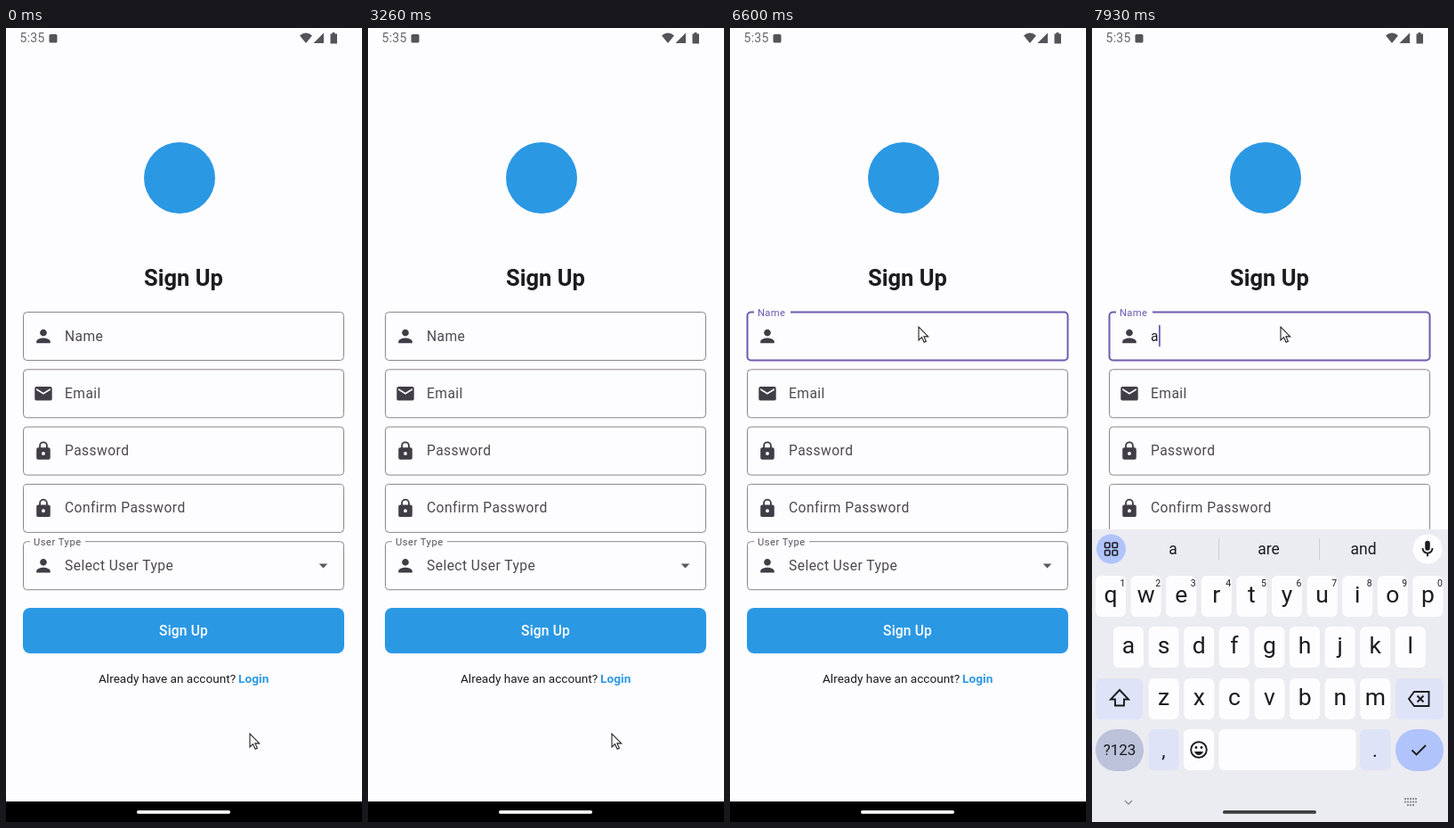
An HTML page that plays this animation: 400x890 px, repeating every 8 s.

```html
<!DOCTYPE html>
<html lang="en">
<head>
<meta charset="utf-8">
<title>Sign Up</title>
<style>
  html, body { margin: 0; width: 100%; height: 100%; overflow: hidden; background: #fdfcff; }
  svg { display: block; width: 400px; height: 890px; font-family: Roboto, sans-serif; }
  .label { font-size: 15.6px; letter-spacing: .44px; fill: #4b4850; }
  .small { font-size: 11.2px; letter-spacing: .5px; fill: #56525c; }
  .mid { text-anchor: middle; }
  .line { fill: none; stroke: #1b1b20; stroke-width: 1.9; }
</style>
</head>
<body>
<svg id="stage" viewBox="0 0 400 890"></svg>
<script>
const INK = '#1b1b20', PAGE = '#fdfcff', ACCENT = '#2b98e4', PURPLE = '#6f5bb0', BORDER = '#8a868f';
const BOARD = '#ebebf2', BLUE = '#b0c3fb', GREY = '#dee3f7', WHITE = '#fdfdff';
const FOCUS = 6060, SLIDE = 7060, TYPED = 7730;

const ICONS = {
  person: 'M12 12c2.2 0 4-1.8 4-4s-1.8-4-4-4-4 1.8-4 4 1.8 4 4 4zm0 2c-2.7 0-8 1.3-8 4v2h16v-2c0-2.7-5.3-4-8-4z',
  mail: 'M20 4H4a2 2 0 0 0-2 2v12a2 2 0 0 0 2 2h16a2 2 0 0 0 2-2V6a2 2 0 0 0-2-2zm0 4l-8 5-8-5V6l8 5 8-5z',
  lock: 'M18 8h-1V6A5 5 0 0 0 7 6v2H6a2 2 0 0 0-2 2v10a2 2 0 0 0 2 2h12a2 2 0 0 0 2-2V10a2 2 0 0 0-2-2zm-6 9a2 2 0 1 1 0-4 2 2 0 0 1 0 4zm3.1-9H8.9V6a3.1 3.1 0 0 1 6.2 0z',
  drop: 'M7 10l5 5 5-5z',
  mic: 'M12 14a3 3 0 0 0 3-3V5a3 3 0 0 0-6 0v6a3 3 0 0 0 3 3zm5-3a5 5 0 0 1-10 0H5a7 7 0 0 0 6 6.9V21h2v-3.1A7 7 0 0 0 19 11z',
  palette: 'M12 3a9 9 0 0 0 0 18 1.5 1.5 0 0 0 1.1-2.5 1.5 1.5 0 0 1 1.1-2.5H16a5 5 0 0 0 5-5c0-4.4-4-8-9-8zM6.5 12a1.5 1.5 0 1 1 0-3 1.5 1.5 0 0 1 0 3zm3-4a1.5 1.5 0 1 1 0-3 1.5 1.5 0 0 1 0 3zm5 0a1.5 1.5 0 1 1 0-3 1.5 1.5 0 0 1 0 3zm3 4a1.5 1.5 0 1 1 0-3 1.5 1.5 0 0 1 0 3z'
};

const text = (x, y, s, attrs = '') => `<text x="${x}" y="${y}" ${attrs}>${s}</text>`;
const rect = (x, y, w, h, r, fill, attrs = '') =>
  `<rect x="${x}" y="${y}" width="${w}" height="${h}" rx="${r}" fill="${fill}" ${attrs}/>`;
const circle = (x, y, r, fill, attrs = '') => `<circle cx="${x}" cy="${y}" r="${r}" fill="${fill}" ${attrs}/>`;
const line = (d, attrs = '') => `<path d="${d}" class="line" ${attrs}/>`;
const icon = (name, x, y, size, fill) =>
  `<path d="${ICONS[name]}" fill="${fill}" transform="translate(${x - size / 2} ${y - size / 2}) scale(${size / 24})"/>`;

function field(i, name, pic) {
  const y = 318.5 + 64.3 * i;
  return rect(19.5, y, 360, 54, 4, 'none', `stroke="${BORDER}" id="box${i}"`) +
    icon(pic, 42, y + 27, 23.3, '#403d46') +
    (i ? text(66, y + 32, name, 'class="label"') : '');
}

function status() {
  return text(15.5, 16, '5:35', 'font-size="14" letter-spacing=".3" fill="#68666c"') +
    rect(48.5, 7, 9, 9.5, 1.5, '#55535a') +
    '<g fill="#55535a"><path d="M330 8.5Q337 2.5 344 8.5L337 17z"/><path d="M357 5.5V17H345.5z"/>' +
    '<path d="M364.5 6.5h2v-1.5h3v1.5h2.5V17.5h-7.5z"/></g>';
}

function page() {
  return rect(0, 0, 400, 890, 0, PAGE) + status() +
    circle(195, 168, 40, ACCENT) +
    text(199.5, 289, 'Sign Up', `class="mid" font-size="25.5" font-weight="700" fill="${INK}"`) +
    field(0, 'Name', 'person') + field(1, 'Email', 'mail') + field(2, 'Password', 'lock') +
    field(3, 'Confirm Password', 'lock') + field(4, 'Select User Type', 'person') +
    icon('drop', 356.5, 602.5, 23.3, '#5a5761') +
    rect(27, 573, 62, 5, 0, PAGE) + text(31, 579.5, 'User Type', 'class="small"') +
    rect(27, 316, 0, 5, 0, PAGE, 'id="gap"') +
    '<text id="name" class="label">Name</text>' +
    text(66, 350.5, 'a', `id="typed" font-size="15.6" fill="${INK}"`) +
    rect(66, 333, 1.8, 24, 0, PURPLE, 'id="caret"') +
    rect(19, 650, 361, 51, 8, ACCENT) +
    text(199.5, 681, 'Sign Up', 'class="mid" font-size="15.6" font-weight="500" letter-spacing=".15" fill="#fff"') +
    text(104, 734, 'Already have an account?', `font-size="13.6" fill="${INK}"`) +
    text(261, 734, 'Login', `font-size="13.6" font-weight="700" letter-spacing=".1" fill="${ACCENT}"`) +
    rect(0, 867, 400, 23, 0, '#000');
}

function gear(x, y) {
  return circle(x, y, 4.9, 'none', `stroke="${INK}" stroke-width="4"`) +
    circle(x, y, 7.6, 'none', `stroke="${INK}" stroke-width="2.6" stroke-dasharray="3.98" stroke-dashoffset="5.97"`);
}

function toolbar() {
  const faint = 'style="stroke:#a5a4ab"';
  return '<g id="tools">' +
    line('M88 593h-12a4 4 0 0 1-4-4v-9a4 4 0 0 1 4-4h10a4 4 0 0 1 4 4v7l-6 6v-6h6M77 585q4 5 8 0M77 580.5h2M83 580.5h2', faint) +
    text(139.5, 589, 'GIF', 'class="mid" font-size="14" font-weight="900" letter-spacing=".8" fill="#a5a4ab"') +
    line('M192 577h14v16h-14zM195 582h8M195 586h8M195 590h5', 'style="stroke-width:1.6"') +
    rect(195.5, 574.5, 7, 4, 1, INK) +
    gear(258.5, 584) + icon('palette', 318, 584, 22, INK) + '</g>' +
    '<g id="words" class="mid" font-size="17.5">' +
    text(91, 590, 'a') + text(198.5, 590, 'are') + text(305, 590, 'and') +
    rect(142, 572, 1, 24, 0, '#cfcfd8') + rect(255, 572, 1, 24, 0, '#cfcfd8') + '</g>';
}

function letters(row, x0, y, digits) {
  return [...row].map((c, i) => {
    const x = x0 + 39.6 * i;
    return rect(x - 17, y, 34, 46, 6, WHITE) + text(x, y + 30, c, 'class="mid" font-size="26.5"') +
      (digits ? text(x + 13.5, y + 12, (i + 1) % 10, 'class="mid" font-size="10.5"') : '');
  }).join('');
}

function keyboard() {
  let grid = '';
  for (const x of [14.5, 23]) for (const y of [577, 585.5])
    grid += rect(x, y, 5.5, 5.5, 1, 'none', 'class="line" style="stroke-width:1.6"');
  return `<g id="keys" fill="${INK}">` + rect(0, 562, 400, 400, 0, BOARD) +
    circle(21.5, 584, 16.5, BLUE) + grid + circle(377, 584, 16.5, WHITE) + icon('mic', 377, 584, 22, INK) +
    toolbar() +
    letters('qwertyuiop', 21, 614, true) + letters('asdfghjkl', 41, 671) + letters('zxcvbnm', 80.7, 729) +
    rect(4, 729, 53, 46, 6, GREY) + line('M31 742l-10 10.5h5v7h10v-7h5z') +
    rect(341, 729, 54, 46, 6, GREY) + line('M362 744h16.5v16H362l-6-8zM365.5 748.5l7 7M372.5 748.5l-7 7') +
    rect(4, 786, 54, 47, 23, '#bbc2d9') + text(31, 815, '?123', 'class="mid" font-size="17"') +
    rect(63.5, 786, 34, 46, 6, GREY) + text(80.5, 817, ',', 'class="mid" font-size="22"') +
    rect(103, 786, 34, 46, 6, WHITE) +
    circle(120, 809, 8.8, 'none', 'class="line"') + circle(117, 806.5, 1.4, INK) + circle(123, 806.5, 1.4, INK) +
    '<path d="M115 811h10q-1.5 4-5 4t-5-4"/>' +
    rect(142.5, 786, 154, 46, 6, WHITE) +
    rect(301, 786, 34.5, 46, 6, GREY) + text(318, 817, '.', 'class="mid" font-size="22"') +
    rect(341, 786, 54, 47, 23, BLUE) + line('M359.5 809.5l5 5 10.5-10.5') + '</g>' +
    '<g id="hints">' + line('M37 866l4 4 4-4', 'style="stroke:#77767e;stroke-width:1.4"') +
    line('M351 864h14M351 867.5h14M354 871h8', 'style="stroke:#77767e;stroke-width:2;stroke-dasharray:2 1"') + '</g>';
}

stage.innerHTML = page() + keyboard() + rect(147, 877, 105, 3.8, 1.9, '#fff', 'id="pill"') +
  '<path id="mouse" d="M0 0v15l3.5-3.3 2.6 5.5 2.3-1-2.5-5.3h4.8z" fill="#fff" stroke="#222" stroke-width="1.1"/>';

const el = id => document.getElementById(id);
const clamp = u => Math.max(0, Math.min(1, u));
const span = (t, from, len) => clamp((t - from) / len);
const mix = (a, b, u) => a + (b - a) * u;
const smooth = u => u * u * (3 - 2 * u);
const set = (id, attrs) => { for (const k in attrs) el(id).setAttribute(k, attrs[k]); };

// time, x, y of the mouse tip
const PATH = [[3480, 274, 791], [3600, 286, 765], [4000, 330, 430], [4300, 323, 317], [4335, 323, 317], [4460, 212, 335]];

function mouseAt(t) {
  let i = 0;
  while (i < PATH.length - 2 && t > PATH[i + 1][0]) i++;
  const [a, b] = [PATH[i], PATH[i + 1]];
  const u = smooth(span(t, a[0], b[0] - a[0]));
  return [mix(a[1], b[1], u), mix(a[2], b[2], u)];
}

function draw(t) {
  set('mouse', { transform: `translate(${mouseAt(t)})` });

  const f = smooth(span(t, FOCUS, 167)), typed = t >= TYPED;
  set('box0', { stroke: t > FOCUS ? PURPLE : BORDER, 'stroke-width': mix(1, 2, f) });
  set('gap', { width: 41 * f });
  set('name', {
    transform: `translate(${mix(66, 31, f)} ${mix(350.5, 323, f)}) scale(${mix(1, .72, f)})`,
    style: t > FOCUS ? `fill:${PURPLE}` : ''
  });

  const lit = typed || (t >= FOCUS && Math.floor((t - FOCUS) / 500) % 2 == 0);
  set('caret', { visibility: lit ? 'visible' : 'hidden', x: typed ? 75 : 66 });
  set('typed', { visibility: typed ? 'visible' : 'hidden' });

  const drop = 328 * (1 - span(t, SLIDE, 330)) ** 3;
  set('keys', { transform: `translate(0 ${drop})`, visibility: t > SLIDE ? 'visible' : 'hidden' });
  const w = span(t, TYPED, 100);
  set('tools', { opacity: 1 - w });
  set('words', { opacity: w });

  const p = span(t, 7240, 240), shade = mix(255, 62, p);
  set('hints', { opacity: p * .8 });
  set('pill', { fill: `rgb(${shade},${shade},${shade})`, opacity: t > 7150 && t < 7240 ? 0 : 1 });
}

function tick(now) {
  draw(now % 8000);
  requestAnimationFrame(tick);
}
draw(0);
requestAnimationFrame(tick);
</script>
</body>
</html>
```
